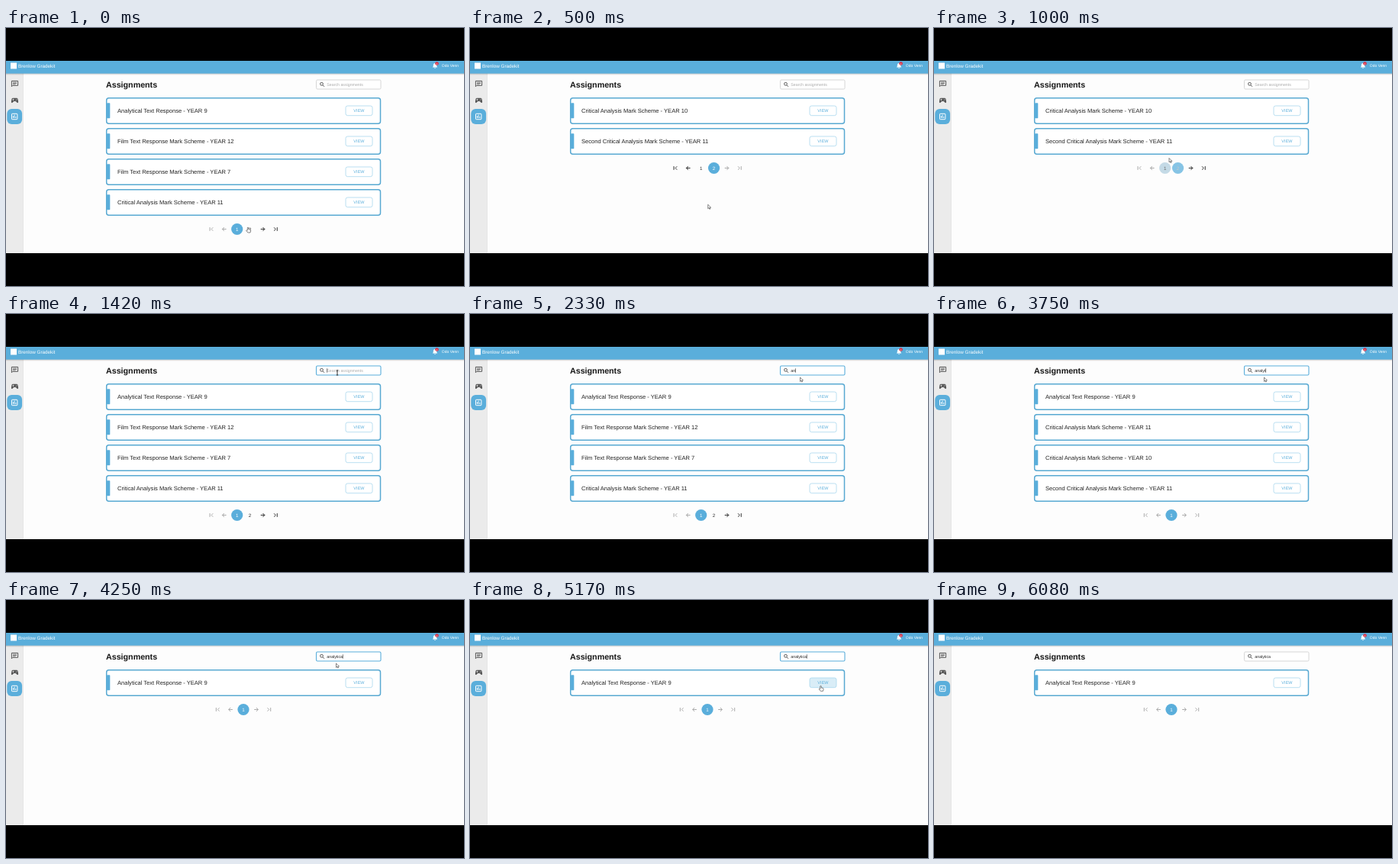
Write an HTML page that moves like this. It is 600x338 px and loops after 6.16 s.

```html
<!DOCTYPE html>
<html lang="en">
<head>
<meta charset="utf-8">
<title>Assignments</title>
<style>
  html, body { margin: 0; width: 100%; height: 100%; overflow: hidden; background: #000; }
  svg { display: block; width: 600px; height: 338px; }
  text { font-family: "Liberation Sans", Arial, sans-serif; text-rendering: geometricPrecision; }
  .mid { text-anchor: middle; }
  .title { font-size: 7.56px; fill: #222; }
  .view { font-size: 5.5px; letter-spacing: .05px; fill: #5aaedb; }
  .query { font-size: 5.25px; }
  .num { font-size: 6.2px; }
  .line { fill: none; stroke-width: 1; }
  .cursor { fill: #fff; stroke: #333; stroke-width: .6; stroke-linejoin: round; }
</style>
</head>
<body>
<svg viewBox="0 0 600 338">
  <defs>
    <clipPath id="screen"><rect y="43" width="600" height="252"/></clipPath>
    <linearGradient id="shade" x2="0" y2="1">
      <stop stop-color="#000" stop-opacity=".2"/>
      <stop offset="1" stop-color="#000" stop-opacity="0"/>
    </linearGradient>
  </defs>
  <rect width="600" height="338"/>
  <g clip-path="url(#screen)">
    <rect y="43" width="600" height="252" fill="#fdfdfd"/>
    <rect y="59" width="22.5" height="236" fill="#ebebeb"/>
    <path d="M22.5 59V295" stroke="#dcdcdc" stroke-width=".6"/>
    <rect y="43" width="600" height="16.7" fill="#5aaedb"/>
    <rect y="59.7" width="600" height="2.2" fill="url(#shade)"/>

    <rect x="6" y="45.5" width="8" height="8" fill="#fff"/>
    <text x="16" y="51.6" font-size="6.3" fill="#fff">Brenlow Gradekit</text>
    <path d="M559 51.6V51l.8-.8V48.300q0-2 2.200-2.300q2.200.3 2.200 2.300v1.900l.8.8v.6zM561.200 52.100h1.600q-.1.900-.8.900t-.8-.9z" fill="#fff"/>
    <circle cx="564.5" cy="46.500" r="2.300" fill="#d8344a"/>
    <text class="mid" x="564.5" y="47.500" font-size="2.800" fill="#fff">4</text>
    <text x="570.800" y="51.300" font-size="5" fill="#fff">Odo Venn</text>

    <g class="line" stroke="#555">
      <path d="M7.400 76.800V69.400h8.200v5.900H8.900z"/>
      <path d="M9 71.200h5M9 72.500h5M9 73.800h3.500" stroke-width=".7"/>
    </g>
    <path d="M9 91.700h5q1.200 0 1.500 1.300l.6 3.400q.1 1.500-1 1.500q-.6 0-1.100-.6l-1.200-1.400h-2.600l-1.200 1.400q-.5.6-1.100.6q-1.100 0-1-1.500l.6-3.400q.3-1.300 1.500-1.300z" fill="#555"/>
    <path d="M8.300 93.900h2.400M9.500 92.700v2.400M12.700 94.600h.9M13.700 93.300h.9" stroke="#ebebeb" stroke-width=".7"/>
    <rect x="1.300" y="106" width="19.800" height="20" rx="6" fill="#5aaedb"/>
    <rect x="7.500" y="112.300" width="7.400" height="7.400" rx=".8" class="line" stroke="#fff"/>
    <path d="M9.500 118v-3M11.200 118v-4.300M12.900 118v-1.700" stroke="#fff" stroke-width=".9"/>

    <text x="131" y="77.600" font-size="10.700" font-weight="bold" fill="#151515">Assignments</text>
    <rect id="box" x="406.500" y="68" width="84.500" height="12" rx="1.500" fill="#fff"/>
    <g class="line" stroke="#555" stroke-width=".8">
      <circle cx="413.500" cy="73.300" r="1.900"/>
      <path d="M414.900 74.700l2.100 2.100"/>
    </g>
    <text id="query" class="query" x="420.300" y="75.800"></text>
    <path id="caret" d="M0 71.300v5.400" stroke="#222" stroke-width=".6"/>

    <g id="cards"></g>
    <g id="pager"></g>
    <g id="pointer">
      <path class="cursor" d="M0 0V5.400L1.300 4.200 2.100 6.100 3 5.700 2.200 3.900H3.900Z"/>
      <path class="cursor" d="M-.7.500Q0-.4.700.5V2.700L3 3.200Q3.700 3.500 3.600 4.300L3 7H-.2L-2.300 4.400Q-2 3.300-.7 4.200Z"/>
      <path class="line" d="M-1.200 0H1.200M0 0V6M-1.200 6H1.200" stroke="#333" stroke-width=".7"/>
    </g>
  </g>
</svg>
<script>
const LOOP = 6160, TICK = 1000 / 12, BLUE = '#5aaedb';
const $ = id => document.getElementById(id);

const titles = [
  'Analytical Text Response - YEAR 9',
  'Film Text Response Mark Scheme - YEAR 12',
  'Film Text Response Mark Scheme - YEAR 7',
  'Critical Analysis Mark Scheme - YEAR 11',
  'Critical Analysis Mark Scheme - YEAR 10',
  'Second Critical Analysis Mark Scheme - YEAR 11'
];
// [time, shown titles]
const lists = [[0, [0, 1, 2, 3]], [330, [4, 5]], [1080, [0, 1, 2, 3]], [2580, [0, 3, 4, 5]], [3830, [0]]];
const word = 'analytica';
const keys = [2170, 2330, 2830, 3080, 3330, 3670, 3830, 4000, 4170];
const FILTERED = 2580, FOCUS = 1420, BLUR = 6080, TO_2 = 250, TO_1 = 920;
// [time, x, y]
const path = [
  [0, 317, 261], [330, 317, 261], [750, 303, 182], [920, 303, 182], [1005, 308, 170.500],
  [1340, 430, 79], [1420, 434, 74], [1670, 434, 74], [2005, 432.500, 83], [4420, 432.500, 83],
  [4700, 353, 52], [5090, 456, 115], [5170, 459.500, 112.300], [5250, 459.500, 112], [5590, 480, 36]
];
// [time, cursor]: 0 arrow, 1 hand, 2 text beam
const shapes = [[0, 1], [410, 0], [750, 1], [1000, 0], [1420, 2], [1910, 0], [5170, 1], [5330, 0]];

const at = (rows, t) => rows.filter(r => r[0] <= t).pop()[1];
const ease = p => p * p * (3 - 2 * p);
const ramp = (t, from, span) => ease(Math.min(1, Math.max(0, (t - from) / span)));
const show = (el, on) => el.setAttribute('visibility', on ? 'visible' : 'hidden');
const move = (el, x, y) => el.setAttribute('transform', `translate(${x} ${y})`);

function add(parent, html) {
  parent.insertAdjacentHTML('beforeend', `<g>${html}</g>`);
  return parent.lastElementChild;
}

const cards = [0, 1, 2, 3].map(i => {
  const card = add($('cards'), `
    <rect x="131.700" y="91.700" width="358.800" height="33.600" rx="3" fill="#fff" stroke="#58a9d2" stroke-width="1.500"/>
    <rect x="132" y="98.300" width="4.300" height="20" rx=".8" fill="${BLUE}"/>
    <text class="title" x="146" y="110.700"></text>
    <rect class="hover" x="445" y="102" width="35" height="12.700" rx="2.500" fill="#d9edf7"/>
    <rect x="445" y="102" width="35" height="12.700" rx="2.500" fill="none" stroke="#a9d7ee" stroke-width=".8"/>
    <text class="view mid" x="462.500" y="110.300">VIEW</text>`);
  move(card, 0, i * 40);
  return card;
});

const stroke = d => `<path class="line" d="${d}"/>`;
const number = n => `<circle class="tint" r="7.600" opacity=".07"/><circle class="fill" r="7.600" fill="${BLUE}"/><text class="num mid" y="2.200">${n}</text>`;
const items = [
  stroke('M-2-2.400V2.400M2.200-2.200L0 0l2.200 2.200'),
  stroke('M2.700 0H-2.400M0-2.500L-2.500 0L0 2.500'),
  number(1),
  number(2),
  stroke('M-2.700 0H2.400M0-2.500L2.500 0L0 2.500'),
  stroke('M2-2.400V2.400M-2.200-2.200L0 0l-2.200 2.200')
].map(html => add($('pager'), html));

function paintNumber(item, chosen, hover) {
  const c = Math.round(50 + 205 * chosen);
  item.querySelector('.fill').setAttribute('opacity', chosen);
  item.querySelector('text').setAttribute('fill', `rgb(${c},${c},${c})`);
  show(item.querySelector('.tint'), hover);
}

function drawPager(t, rows) {
  const single = t >= FILTERED;
  const second = t >= TO_2 && t < TO_1;
  const chosen2 = ramp(t, TO_2, 250) - ramp(t, TO_1, 250);
  const left = single ? 277.300 : 269;
  const y = 126 + 40 * (rows - 1) + 17.500;
  items.forEach((item, i) => {
    move(item, left + 16.850 * (single && i > 3 ? i - 1 : i), y);
    const live = !single && (i < 2 ? second : !second);
    item.setAttribute('stroke', i === 2 || i === 3 ? 'none' : live ? '#333' : '#aaa');
  });
  paintNumber(items[2], 1 - chosen2, t >= 750 && t < 1080);
  paintNumber(items[3], chosen2, false);
  items[3].style.display = single ? 'none' : '';
}

function drawSearch(t) {
  const focus = t >= FOCUS && t < BLUR;
  const count = keys.filter(k => k <= t).length;
  const query = $('query');
  query.textContent = word.slice(0, count) || 'Search assignments';
  query.setAttribute('fill', count ? '#222' : '#aaa');
  $('box').setAttribute('stroke', focus ? BLUE : '#ccc');
  $('box').setAttribute('stroke-width', focus ? 1.100 : .8);
  const since = t - (count ? keys[count - 1] : FOCUS);
  show($('caret'), focus && since % 1000 < 500);
  move($('caret'), 420.600 + (count ? query.getComputedTextLength() : 0), 0);
}

function drawPointer(t) {
  const next = path.findIndex(p => p[0] > t);
  const b = path[next < 0 ? path.length - 1 : next];
  const a = next < 0 ? b : path[next - 1];
  const p = a === b ? 1 : ease((t - a[0]) / (b[0] - a[0]));
  move($('pointer'), a[1] + (b[1] - a[1]) * p, a[2] + (b[2] - a[2]) * p);
  [...$('pointer').children].forEach((el, i) => show(el, i === at(shapes, t)));
}

function draw(t) {
  const list = at(lists, t);
  cards.forEach((card, i) => {
    card.style.display = i < list.length ? '' : 'none';
    card.querySelector('.title').textContent = titles[list[i]] || '';
    const hover = i === 0 && t >= 5170 ? 1 - ramp(t, 5330, 250) : 0;
    card.querySelector('.hover').setAttribute('opacity', hover);
  });
  drawPager(t, list.length);
  drawSearch(t);
  drawPointer(t);
}

const start = performance.now();
function frame() {
  const t = (performance.now() - start) % LOOP;
  draw(Math.floor((t + 5) / TICK) * TICK + 5);
  requestAnimationFrame(frame);
}
frame();
</script>
</body>
</html>
```
